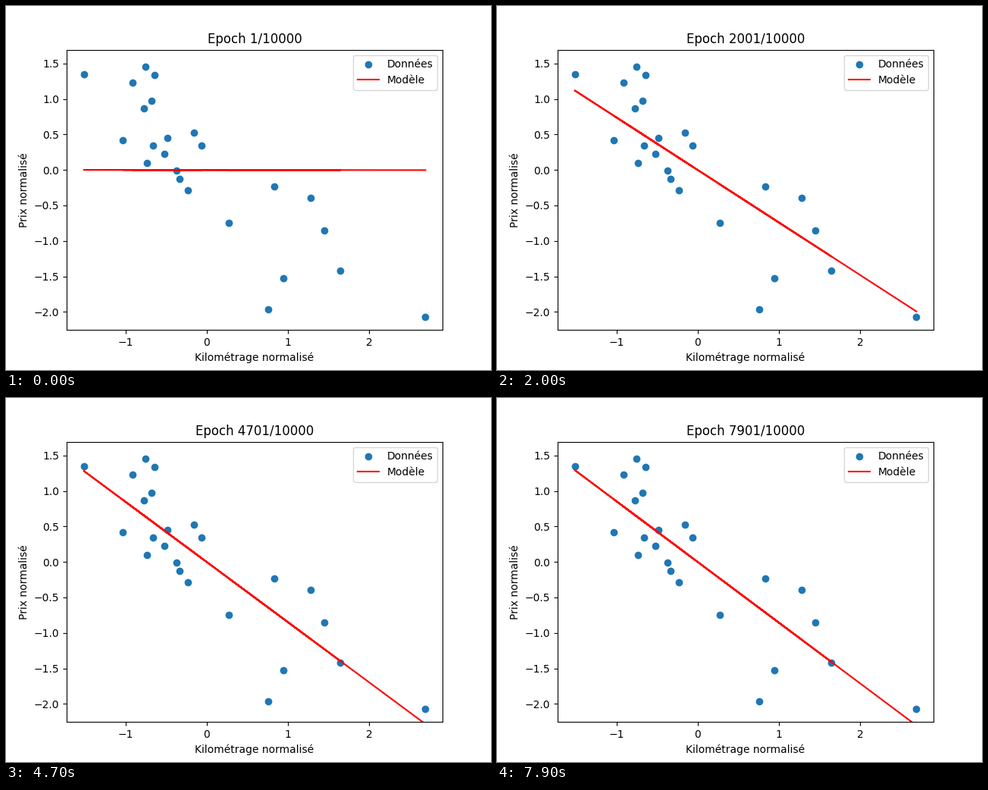
A matplotlib script for the animation above (8000 ms loop, 640 px wide and 480 px high).

```python
import numpy as np
import matplotlib.pyplot as plt
from matplotlib.animation import FuncAnimation

EPOCHS = 10000
STEP = 100
FRAMES = 80
RATE = 0.001
FINAL_SLOPE = -0.8561

# Cars sell in pairs around rising price levels; mileage is in 1000 km.
LEVELS = [3725, 4425, 5300, 5895, 6100, 6390,
          6700, 6850, 6945, 7520, 7990, 8140]
HALF_GAP = 70
KM = [240, 140, 150, 186, 176, 115, 167, 89, 144, 84, 82, 63,
      74, 98, 67, 76, 48, 93, 61, 66, 54, 68, 23, 62]


def normalise(values):
    values = np.asarray(values, float)
    return (values - values.mean()) / values.std()


def slope_at(epoch):
    """Gradient descent from 0 closes in on the final slope geometrically."""
    return FINAL_SLOPE * (1 - (1 - RATE) ** epoch)


x = normalise(KM)
y = normalise(np.add.outer(LEVELS, [-HALF_GAP, HALF_GAP]).ravel())

fig, ax = plt.subplots(figsize=(6.4, 4.8), dpi=100)
ax.scatter(x, y, label="Données")
line, = ax.plot(x, slope_at(1) * x, color="red", label="Modèle")
ax.set_ylim(-2.2555, 1.6954)
ax.set_xlabel("Kilométrage normalisé")
ax.set_ylabel("Prix normalisé")
title = ax.set_title(f"Epoch 1/{EPOCHS}")
ax.legend(loc="upper right")


def update(i):
    epoch = 1 + i * STEP
    line.set_ydata(slope_at(epoch) * x)
    title.set_text(f"Epoch {epoch}/{EPOCHS}")
    return line, title


anim = FuncAnimation(fig, update, frames=FRAMES, interval=100,
                     repeat=True, repeat_delay=0, blit=False)
plt.show()
```
